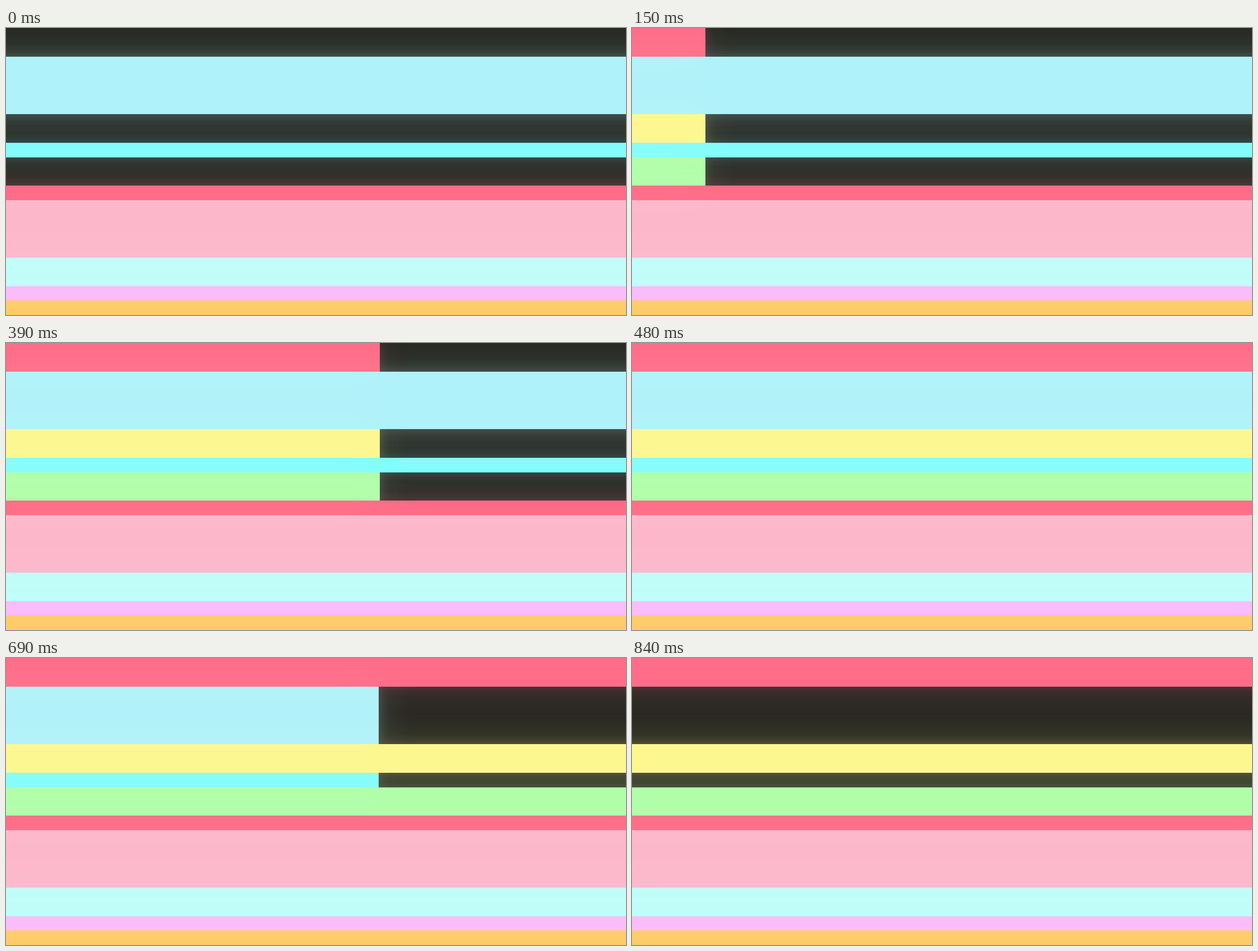
An HTML page that plays this animation: 1098 by 510 pixels, repeating every 1030 ms.

```html
<!DOCTYPE html>
<html>
<head>
<meta charset="utf-8">
<style>
html, body { margin: 0; width: 100%; height: 100%; overflow: hidden; background: #272822; }
#stage { position: absolute; left: 0; top: 0; width: 1098px; height: 510px; overflow: hidden; isolation: isolate; background: #272822; }
#stage div { position: absolute; left: -200px; }
.under { z-index: 0; }
.bar { z-index: 1; }
.over { z-index: 2; mix-blend-mode: screen; }
</style>
</head>
<body>
<div id="stage"></div>
<script>
const WIDTH = 1098, MARGIN = 200, LOOP = 1030, TICK = 30;
const stage = document.getElementById('stage');

// top, bottom, colour, behaviour
const rows = [
  [0, 51, '255,109,136', 'grow'],
  [51, 153, '176,242,249', 'shrink'],
  [153, 204, '253,247,142', 'grow'],
  [204, 230, '130,253,251', 'shrink'],
  [230, 280, '175,254,169', 'grow'],
  [280, 306, '255,104,132', 'full'],
  [306, 408, '253,183,203', 'full'],
  [408, 459, '190,253,249', 'full'],
  [459, 484, '250,186,249', 'full'],
  [484, 510, '253,203,102', 'full']
];

function addLayer(kind, top, bottom) {
  const el = document.createElement('div');
  el.className = kind;
  el.style.top = top + 'px';
  el.style.height = bottom - top + 'px';
  stage.append(el);
  return el;
}

const bars = rows.map(([top, bottom, rgb, mode]) => {
  const [under, bar, over] = ['under', 'bar', 'over'].map(k => addLayer(k, top, bottom));
  under.style.boxShadow = `0 0 20px rgba(${rgb},.2), 0 0 70px rgba(${rgb},.12)`;
  bar.style.background = `rgb(${rgb})`;
  over.style.boxShadow = `0 0 70px rgba(${rgb},.09)`;
  return { mode, layers: [under, bar, over] };
});

// cubic-bezier(.42, 0, 1, 1)
function easeIn(x) {
  let lo = 0, hi = 1;
  for (let i = 0; i < 30; i++) {
    const s = (lo + hi) / 2, y = s * s * (3 - 2 * s);
    if (1.26 * (1 - s) ** 2 * s + y < x) lo = s; else hi = s;
  }
  return lo * lo * (3 - 2 * lo);
}

// Slightly uneven clock: [ms, progress] pairs
function progress(t, keys) {
  if (t <= keys[0][0]) return 0;
  for (let i = 1; i < keys.length; i++) {
    const [a, p] = keys[i - 1], [b, q] = keys[i];
    if (t < b) return easeIn(p + (q - p) * (t - a) / (b - a));
  }
  return 1;
}

const growKeys = [[0, 0], [150, .2847], [270, .497], [390, .736], [480, 1]];
const shrinkKeys = [[540, 0], [570, .19], [630, .3823], [750, .767], [810, .96], [840, 1]];

function draw(now) {
  const t = Math.floor(now % LOOP / TICK) * TICK;
  const share = {
    grow: progress(t, growKeys),
    shrink: 1 - progress(t, shrinkKeys),
    full: 1
  };
  for (const { mode, layers } of bars) {
    const p = share[mode];
    // Full and empty bars end off stage, so their edge never glows
    const width = p <= 0 ? 0 : p >= 1 ? WIDTH + 2 * MARGIN : MARGIN + Math.round(WIDTH * p);
    for (const el of layers) {
      el.style.width = width + 'px';
      el.style.visibility = width ? 'visible' : 'hidden';
    }
  }
}

const start = performance.now();
function loop() {
  draw(performance.now() - start);
  requestAnimationFrame(loop);
}
loop();
</script>
</body>
</html>
```
